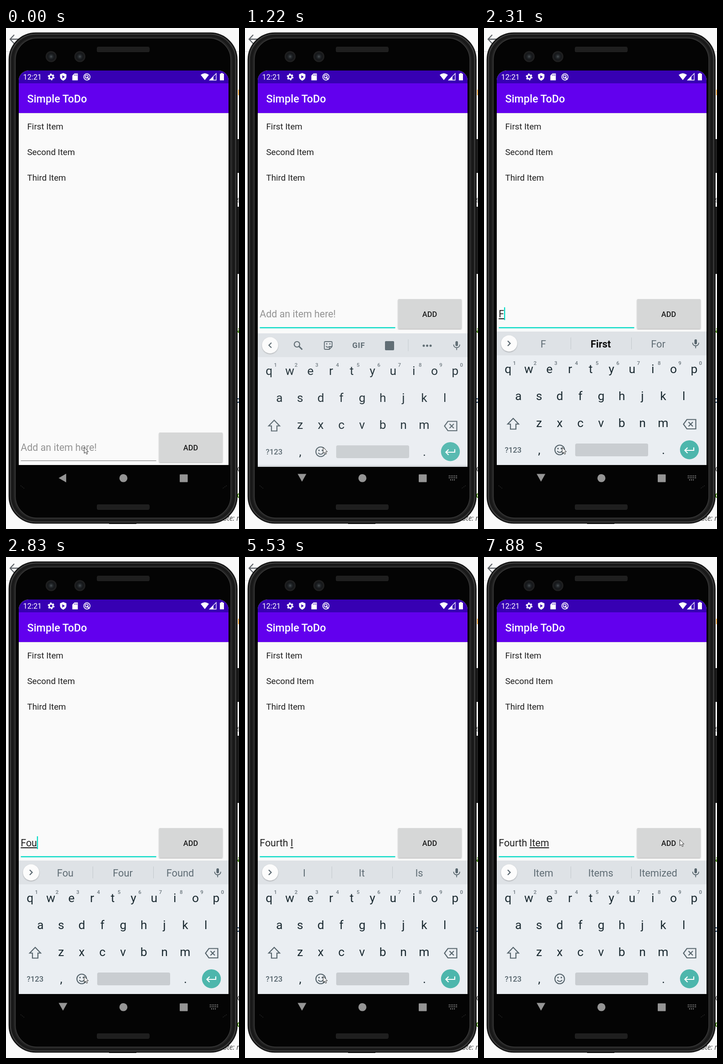
An HTML page that plays this animation: 511x1096 px, repeating every 8000 ms.

```html
<!DOCTYPE html>
<html lang="en">
<head>
<meta charset="utf-8">
<title>Simple ToDo</title>
<style>
  html, body { margin: 0; width: 100%; height: 100%; overflow: hidden; background: #fafafa; }
  svg { display: block; width: 511px; height: 1096px; font-family: Roboto, sans-serif; }
  text { white-space: pre; }
  .mid { text-anchor: middle; }
  .line { fill: none; stroke: #56646c; stroke-width: 2.2; }
  .grey { fill: #56646c; }
  .item { font-size: 18.74px; fill: #212121; }
  .field { font-size: 21.4px; }
  .word { font-size: 21.8px; }
  .key { font-size: 26.4px; fill: #1b2a31; text-anchor: middle; }
  .digit { font-size: 11.5px; font-weight: 500; fill: #6b767d; text-anchor: middle; }
  .page { font: 17px "Open Sans", sans-serif; }
</style>
</head>
<body>
<svg viewBox="0 0 511 1096">
  <defs>
    <pattern id="mesh" width="3" height="3" patternUnits="userSpaceOnUse">
      <rect width="3" height="3" fill="#262626"/><circle cx="1.5" cy="1.5" r=".9" fill="#0c0c0c"/>
    </pattern>
    <linearGradient id="side" x2="1" y2="0">
      <stop stop-color="#0c0c0c"/><stop offset=".5" stop-color="#2c2c2c"/><stop offset="1" stop-color="#0c0c0c"/>
    </linearGradient>
    <radialGradient id="lens"><stop stop-color="#4a5055"/><stop offset=".3" stop-color="#24282b"/><stop offset=".6" stop-color="#15171a"/><stop offset="1" stop-color="#232323"/></radialGradient>
    <filter id="soft" x="-20%" y="-20%" width="140%" height="150%"><feDropShadow dx="0" dy="1.2" stdDeviation="1.2" flood-opacity=".3"/></filter>
    <clipPath id="screen"><rect x="28" y="93" width="460" height="930" rx="22"/></clipPath>
  </defs>

  <!-- page behind the phone -->
  <rect width="511" height="1096" fill="#fafafa"/>
  <rect y="51" width="511" height="1" fill="#ddd"/>
  <path d="M30 24.500H9M18 15l-9 9.500 9 9.500" fill="none" stroke="#5f6368" stroke-width="2.3"/>
  <rect x="509" y="135" width="2" height="12" fill="#f5a33b"/>
  <g class="page">
    <text x="506" y="381" fill="#333">s</text>
    <text x="507" y="667" fill="#3c7d0d" font-weight="700">a</text>
    <text x="503" y="820" fill="#0b2a4a" font-weight="700">c</text>
    <text x="507" y="971" fill="#333">C</text>
    <text x="506" y="1028" fill="#3c7d0d" font-weight="700">o</text>
    <text x="476" y="1078" fill="#444" font-style="italic" font-size="15.500">ote: r</text>
  </g>

  <!-- phone body -->
  <rect x="504" y="243" width="8" height="74" rx="1" fill="url(#side)"/>
  <rect x="504" y="391" width="8" height="147" rx="1" fill="url(#side)"/>
  <rect x="226" y="1080" width="60" height="5" fill="#0c0c0c"/>
  <g stroke-width="1.5">
    <rect x="6.500" y="10.500" width="500.500" height="1073" rx="59" fill="#232323" stroke="#050505"/>
    <rect x="10" y="13.500" width="493.500" height="1067" rx="56" fill="#1a1a1a" stroke="#454545"/>
    <rect x="15.500" y="18" width="482.500" height="1058" rx="52" fill="#232323" stroke="#161616"/>
    <rect x="20.500" y="22" width="472.500" height="1050" rx="48" fill="#040404" stroke="#3a3a3a"/>
  </g>
  <rect x="199" y="41" width="116" height="12" rx="4" fill="url(#mesh)"/>
  <rect x="199" y="1042" width="116" height="12" rx="4" fill="url(#mesh)"/>
  <circle cx="99" cy="62.500" r="12" fill="url(#lens)"/>
  <circle cx="162" cy="62.500" r="12" fill="url(#lens)"/>
  <path d="M32 1001l9 7M484 1001l-10 7" stroke="#444" stroke-dasharray="2 2"/>

  <!-- app -->
  <g clip-path="url(#screen)">
    <rect x="28" y="93" width="460" height="863" fill="#fafafa"/>
    <rect x="28" y="186" width="460" height="1" fill="#dcdae2"/>
    <rect x="28" y="93" width="460" height="28" fill="#3700b3"/>
    <rect x="28" y="121" width="460" height="65" fill="#6200ee"/>
  </g>
  <g fill="#fff">
    <text x="37.500" y="113" font-size="16.400">12:21</text>
    <g fill="none" stroke="#fff">
      <circle cx="99" cy="107" r="4.200" stroke-width="3"/>
      <circle cx="99" cy="107" r="6.200" stroke-width="2.400" stroke-dasharray="3.250 3.250"/>
      <circle cx="177.500" cy="107" r="6.900" stroke-width="1.600"/>
      <circle cx="177" cy="106.500" r="3.300" stroke-width="1.600"/>
      <path d="M177 107l6 6" stroke-width="2"/>
    </g>
    <path d="M125.500 98.500l7 2.700v5c0 4-3 7.500-7 9-4-1.500-7-5-7-9v-5z"/>
    <path d="M123.500 103.500v7l5.500-3.500z" fill="#3700b3"/>
    <path d="M150 99.500h7.500v15h-12v-10.500z"/>
    <path d="M150.500 101.500v3M153 101.500v3M155.500 101.500v3" stroke="#3700b3"/>
    <path d="M427 102.500q9-7 18 0l-9 11.500z"/>
    <path d="M461 99.500v14.500h-14.500z" fill="none" stroke="#fff" stroke-width="1.300"/>
    <path d="M455 106v8h-8z"/>
    <path d="M471.500 98.500h4v1.500h2.500v14.500h-9v-14.500h2.500z"/>
    <text x="46.500" y="162.500" font-size="23.400" font-weight="500">Simple ToDo</text>
  </g>
  <text class="item" x="46.500" y="221.700">First Item</text>
  <text class="item" x="46.500" y="277.900">Second Item</text>
  <text class="item" x="46.500" y="334.100">Third Item</text>

  <!-- entry row -->
  <g id="entry">
    <rect id="rule" x="32.500" width="297"/>
    <text id="hint" class="field" x="32.300" y="925" fill="#939393">Add an item here!</text>
    <text id="typed" class="field" x="32.300" y="925" fill="#212121"><tspan id="done"></tspan><tspan id="composing" text-decoration="underline"></tspan></text>
    <rect id="caret" y="903" width="2.300" height="28" fill="#03dac5"/>
    <rect x="335.500" y="885" width="139.500" height="65" rx="2" fill="#d6d7d7" filter="url(#soft)"/>
    <text class="mid" x="405" y="923.700" font-size="16.400" font-weight="500" fill="#1c1c1c">ADD</text>
  </g>

  <!-- navigation bar -->
  <g fill="#959595">
    <path id="back" d="M115.500 984.500l16.500-9.500v19z"/>
    <path id="hide" d="M115.500 975.500h19l-9.500 17z"/>
    <circle cx="257.500" cy="984.700" r="8.800"/>
    <rect x="381" y="976.500" width="17.500" height="17" rx="1"/>
    <path id="switcher" d="M447 980h18M447 984h18M450 988.500h12" stroke="#959595" stroke-width="2" stroke-dasharray="2 2"/>
  </g>

  <!-- keyboard -->
  <g id="keyboard">
    <rect x="28" y="664" width="460" height="292" fill="#eaeef2"/>
    <rect x="28" y="664" width="460" height="52" fill="#dee2e6"/>
    <circle cx="55" cy="690" r="17.700" fill="#fcfcfc" filter="url(#soft)"/>
    <path id="chevron" class="line"/>
    <g class="line">
      <rect x="461.500" y="681" width="5.500" height="11" rx="2.700" fill="#56646c" stroke="none"/>
      <path d="M457.500 688.500c0 9 13.500 9 13.500 0M464.200 695.500v5" stroke-width="1.800"/>
    </g>
    <g id="tools">
      <g class="line">
        <circle cx="114" cy="688" r="6"/><path d="M118.500 692.500l7 7" stroke-width="3"/>
        <path d="M176 682h13q2 0 2 2v9l-6 6h-9q-2 0-2-2v-13q0-2 2-2zM185 699v-6h6M177.500 692q4 4 6.500 1" stroke-width="1.800"/>
        <path d="M178 687h2.500M185 687h2.500" stroke-width="2.500"/>
      </g>
      <text class="mid grey" x="249.200" y="696" font-size="17" font-weight="700" letter-spacing=".7">GIF</text>
      <rect class="grey" x="307" y="681" width="20" height="20" rx="2"/>
      <path d="M358 677v26" stroke="#c2c8cc"/>
      <g class="grey"><circle cx="392" cy="691" r="2.500"/><circle cx="399.500" cy="691" r="2.500"/><circle cx="407" cy="691" r="2.500"/></g>
    </g>
    <g id="words" class="word mid">
      <path d="M190.500 677v26M323.500 677v26" stroke="#c2c8cc"/>
      <text x="130" y="699"></text><text x="256" y="699"></text><text x="382" y="699"></text>
    </g>
    <g id="keys"></g>
    <g class="line">
      <path d="M64 854l12 12.500h-6v11h-12v-11h-6z"/>
      <path d="M445 856.500h19.500v20.500H445l-7.500-10.250zM448.500 862l9.500 9.500M458 862l-9.500 9.500"/>
      <circle cx="166" cy="923" r="10.500"/>
      <path d="M160.500 925.500q5.500 6 11 0" stroke-width="2"/>
    </g>
    <g class="grey"><circle cx="162.300" cy="920" r="1.700"/><circle cx="169.700" cy="920" r="1.700"/></g>
    <text class="mid grey" x="64" y="929" font-size="16.800" font-weight="500">?123</text>
    <text class="key" x="121" y="932">,</text>
    <text class="key" x="393.500" y="932">.</text>
    <rect x="200" y="909" width="160" height="28" rx="3.500" fill="#c9cdd1"/>
    <circle cx="450.500" cy="922.700" r="20.700" fill="#4db6ac"/>
    <path d="M460 917.500v6.500h-19M446.500 918l-6 6 6 6" fill="none" stroke="#fff" stroke-width="2.200"/>
  </g>

  <path id="pointer" d="M.5.500v13l3-2.700 2.200 4.700 2.200-1-2.100-4.500h4z" fill="#fff" stroke="#333" stroke-width="1"/>
</svg>

<script>
const $ = id => document.getElementById(id);
const LOOP = 8000, FOCUS = 500, OPEN = 1220, SETTLED = 1370, TYPING = 2310;

// time, committed text, text being composed, three suggestions
const edits = [
  [0, '', '', '', '', ''],
  [2310, '', 'F', 'F', 'First', 'For'],
  [2580, '', 'Fo', 'Fo', 'For', 'Football'],
  [2830, '', 'Fou', 'Fou', 'Four', 'Found'],
  [3390, '', 'Four', 'Four', 'Fourth', 'Fours'],
  [3650, '', 'Fourt', 'Fourt', 'Fourth', 'Fourteen'],
  [3780, '', 'Fourth', 'Fourth', 'Forth', 'Fourths'],
  [4370, 'Fourth ', '', 'and', 'of', 'in'],
  [4970, 'Fourth ', 'I', 'I', 'It', 'Is'],
  [5950, 'Fourth ', 'It', 'It', 'Item', 'Its'],
  [6230, 'Fourth ', 'Ite', 'Ite', 'Item', 'Its'],
  [6490, 'Fourth ', 'Item', 'Item', 'Items', 'Itemized'],
];
const blinks = [[0, 0], [500, 1], [1220, 0], [1670, 1], [2040, 0], [2310, 1],
  [5530, 0], [5950, 1], [6890, 0], [7310, 1], [7880, 0]];
const moves = [[0, 171, 917], [7190, 146, 886], [7310, 220, 812], [7430, 321, 746],
  [7580, 492, 647], [7730, 482, 608], [7880, 429, 618]];

const at = (steps, t) => steps.findLast(step => step[0] <= t);
const show = (id, on) => $(id).style.display = on ? '' : 'none';

function addKey(cls, x, y, label) {
  const key = document.createElementNS('http://www.w3.org/2000/svg', 'text');
  key.setAttribute('class', cls);
  key.setAttribute('x', x);
  key.setAttribute('y', y);
  key.textContent = label;
  $('keys').append(key);
}
[['qwertyuiop', 52.7], ['asdfghjkl', 75.4], ['zxcvbnm', 120.7]].forEach(([row, left], r) =>
  [...row].forEach((letter, i) => {
    const x = left + i * 45.35;
    addKey('key', x, 755 + r * 59, letter);
    if (r === 0) addKey('digit', x + 14, 737, (i + 1) % 10);
  }));

function draw(t) {
  const focused = t >= FOCUS, open = t >= OPEN, typing = t >= TYPING;
  const rising = open && t < SETTLED;
  const [, done, composing, ...words] = at(edits, t);

  $('entry').setAttribute('transform', `translate(0 ${open ? -292 : 0})`);
  $('rule').setAttribute('y', focused ? 946.5 : 946);
  $('rule').setAttribute('height', focused ? 2.4 : 1.2);
  $('rule').setAttribute('fill', focused ? '#03dac5' : '#808080');
  show('hint', !typing);
  $('done').textContent = done;
  $('composing').textContent = composing;
  show('caret', at(blinks, t)[1]);
  $('caret').setAttribute('x', 32.2 + (typing ? $('typed').getComputedTextLength() : 0));

  show('back', !open);
  show('hide', open);
  show('switcher', open);
  show('keyboard', open);
  $('keyboard').setAttribute('transform', `translate(0 ${rising ? 4 : 0})`);
  $('keyboard').setAttribute('opacity', rising ? 0.93 : 1);
  show('tools', !typing);
  show('words', typing);
  $('chevron').setAttribute('d', typing ? 'M52 684.500l5.500 5.500-5.500 5.500' : 'M58 684.500l-5.500 5.500 5.500 5.500');
  $('words').querySelectorAll('text').forEach((word, i) => {
    const best = words[i] === 'First';
    word.textContent = words[i];
    word.setAttribute('font-weight', best ? 700 : 400);
    word.setAttribute('fill', best ? '#0a0a0a' : '#5f6c74');
  });

  const [, x, y] = at(moves, t);
  $('pointer').setAttribute('transform', `translate(${x} ${y})`);
}

function tick() {
  draw(performance.now() % LOOP);
  requestAnimationFrame(tick);
}
tick();
</script>
</body>
</html>
```
